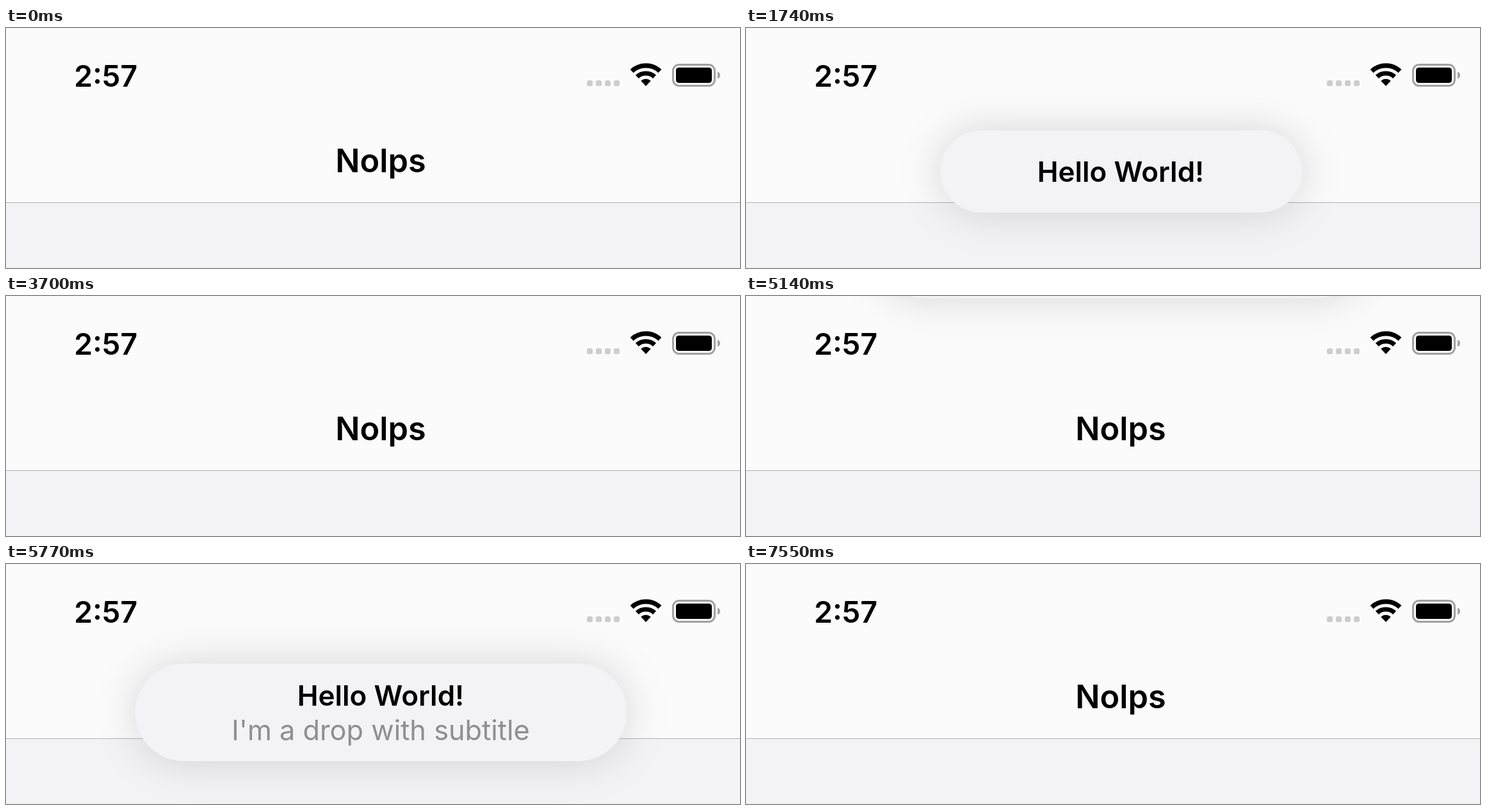
Animation, 1146 px wide and 376 px high, one loop 8000 ms. Source, as an HTML page:

```html
<!DOCTYPE html>
<html lang="en">
<head>
<meta charset="utf-8">
<title>Notification pill</title>
<style>
  html, body { margin: 0; width: 100%; height: 100%; overflow: hidden; background: #fbfbfb; }
  svg { display: block; width: 100vw; height: 100vh; font-family: Inter, Roboto, sans-serif; }
  .strong { font-weight: 600; }
  .middle { text-anchor: middle; }
</style>
</head>
<body>
<svg viewBox="0 0 1146 376" xmlns="http://www.w3.org/2000/svg">
  <defs>
    <filter id="blur" filterUnits="userSpaceOnUse" x="0" y="-400" width="1146" height="900">
      <feGaussianBlur stdDeviation="32"/>
    </filter>
  </defs>

  <rect width="1146" height="376" fill="#fbfbfb"/>
  <rect y="273" width="1146" height="103" fill="#f3f3f5"/>
  <rect y="273" width="1146" height="1" fill="#b2b2b4"/>
  <text class="strong middle" x="585" y="225.5" font-size="50.5">Nolps</text>

  <g id="pills"></g>

  <g id="status">
    <text class="strong" x="106.3" y="91.5" font-size="46.5">2:57</text>
    <g id="dots" fill="#000" fill-opacity=".18"></g>
    <g id="wifi"></g>
    <rect x="1041.5" y="57.5" width="65" height="33" rx="9.5" fill="none" stroke="#a1a1a3" stroke-width="3"/>
    <rect x="1046" y="62" width="56" height="24" rx="4.5"/>
    <path d="M1111 68.5Q1115 70 1115 74T1111 79.5Z" fill="#a1a1a3"/>
  </g>
</svg>

<script>
const LOOP = 8000;
const CENTER_X = 585.5;
const REST_Y = 156;
const SHOW_MS = 600;
const HIDE_MS = 250;

const byId = id => document.getElementById(id);

function add(parent, tag, attrs, text) {
  const node = document.createElementNS('http://www.w3.org/2000/svg', tag);
  for (const name in attrs) node.setAttribute(name, attrs[name]);
  if (text) node.textContent = text;
  return parent.appendChild(node);
}

function drawStatusIcons() {
  for (let i = 0; i < 4; i++) {
    add(byId('dots'), 'rect', { x: 907 + 14 * i, y: 82, width: 9, height: 9, rx: 2.8 });
  }
  const half = 43 * Math.PI / 180;
  const arc = r => {
    const dx = r * Math.sin(half), y = 91 - r * Math.cos(half);
    return `M${999 - dx} ${y}A${r} ${r} 0 0 1 ${999 + dx} ${y}`;
  };
  for (const r of [32.1, 20]) {
    add(byId('wifi'), 'path', { d: arc(r), fill: 'none', stroke: '#000', 'stroke-width': 7.2 });
  }
  add(byId('wifi'), 'path', { d: arc(11.3) + 'L999 91Z' });
}

function makePill({ width, height, lines, show, hide }) {
  const group = add(byId('pills'), 'g', {});
  const shape = { x: CENTER_X - width / 2, width, height, rx: height / 2 };
  add(group, 'rect', { ...shape, fill: '#000', 'fill-opacity': .15, filter: 'url(#blur)' });
  add(group, 'rect', { ...shape, fill: '#f3f3f5' });
  for (const { text, ...attrs } of lines) {
    add(group, 'text', { x: 585, 'font-size': 44, ...attrs }, text);
  }
  return { group, height, show, hide };
}

// Damped spring, ratio 0.8, settling to 0.1% within SHOW_MS.
function spring(ms) {
  const damping = 0.8;
  const decay = Math.log(1000) / SHOW_MS;
  const freq = decay * Math.sqrt(1 - damping ** 2) / damping;
  return 1 - Math.exp(-decay * ms) * (Math.cos(freq * ms) + decay / freq * Math.sin(freq * ms));
}

// cubic-bezier(.42, 0, 1, 1)
function easeIn(x) {
  let low = 0, high = 1;
  for (let i = 0; i < 20; i++) {
    const s = (low + high) / 2;
    const at = 3 * .42 * s * (1 - s) ** 2 + 3 * s * s * (1 - s) + s ** 3;
    if (at < x) low = s; else high = s;
  }
  return 3 * low * low - 2 * low ** 3;
}

const title = { text: 'Hello World!', class: 'strong middle' };
const subtitle = { text: "I'm a drop with subtitle", class: 'middle', fill: '#8e8e93', 'font-size': 43.3 };

const pills = [
  makePill({ width: 565, height: 129, show: 1390, hide: 3450,
    lines: [{ ...title, y: 80.5 }] }),
  makePill({ width: 768, height: 153, show: 5130, hide: 7165,
    lines: [{ ...title, y: 66 }, { ...subtitle, y: 120 }] })
];

function render(t) {
  for (const { group, height, show, hide } of pills) {
    const visible = t >= show && t < hide + HIDE_MS;
    group.style.display = visible ? '' : 'none';
    if (!visible) continue;
    const travel = REST_Y + height;
    const shown = t < hide
      ? (t - show > SHOW_MS ? 1 : spring(t - show))
      : 1 - easeIn((t - hide) / HIDE_MS);
    group.setAttribute('transform', `translate(0 ${travel * shown - height})`);
  }
}

drawStatusIcons();
const start = performance.now();
function tick() {
  render((performance.now() - start) % LOOP);
  requestAnimationFrame(tick);
}
tick();
</script>
</body>
</html>
```
